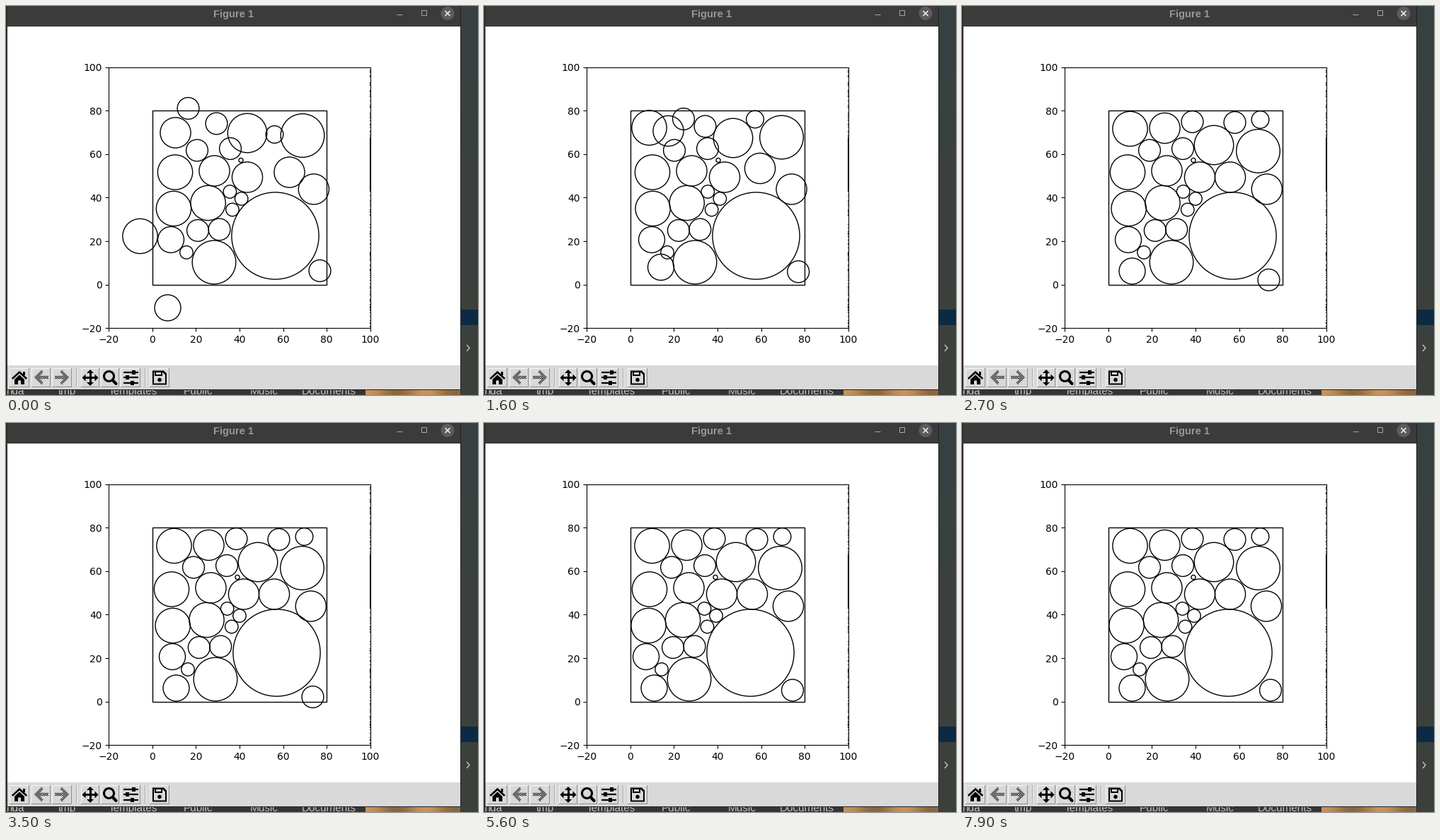
Animation of 667 by 551 pixels, one loop 8000 ms. Source, as a matplotlib script:

```python
import numpy as np
import matplotlib.pyplot as plt
from matplotlib.animation import FuncAnimation
from matplotlib.patches import Circle, Polygon, Rectangle

W, H = 667, 551
FRAMES, STEP = 80, 100
UNIT = 3.08            # pixels per data unit
X0, Y0 = 206.8, 394.6  # pixel position of the data origin

# Packed layout: radius in data units, centre in stage pixels
PACKING = [
    (5, 325.5, 164), (7, 286.5, 173), (5, 385.5, 165), (9, 356, 197),
    (4, 421.5, 161), (10, 418.5, 205.5), (5, 265, 204.5), (5, 312, 202),
    (1, 327, 218.5), (8, 234, 235.5), (7, 289.5, 233.5), (7, 336, 242.5),
    (7, 379, 242.5), (7, 430, 259.5), (8, 232.5, 287), (8, 281, 279),
    (3, 311.5, 263), (3, 328, 273), (3, 315.5, 288.5), (5, 297.5, 316.5),
    (20, 376.5, 325.5), (8, 237.5, 174), (6, 229, 331), (5, 267, 318),
    (3, 251, 349), (10, 290, 363), (5, 436, 378.5), (6, 240.5, 375.5)]

# Key points (step, x, y) of the circles that travel far before they settle
JOURNEYS = {
    0: [(3, 257.5, 145), (12, 262, 146), (16, 282, 160)],
    1: [(3, 239.5, 179.5), (16, 260.5, 177)],
    2: [(3, 297.5, 166.5), (16, 312.5, 170.5)],
    3: [(3, 341, 180), (16, 352, 187)],
    4: [(3, 379.5, 182), (16, 383, 160.5)],
    5: [(3, 419, 183.5), (16, 420.5, 186)],
    12: [(3, 400.5, 235.5), (16, 390, 230)],
    21: [(3, 189.5, 326), (13, 163, 322), (14, 231, 155), (16, 233.5, 172.5)],
    26: [(3, 443.5, 375), (22, 444.5, 377), (23, 449, 384), (27, 433.5, 388),
         (35, 433.5, 388), (41, 447.5, 379)],
    27: [(3, 228.5, 427.5), (6, 228, 438), (11, 230, 419), (16, 250, 370),
         (21, 247, 420), (22, 245.5, 394)]}

steps = np.arange(FRAMES)


def journey(points, x, y):
    arrival = max(22, points[-1][0] + 4)
    t, xs, ys = zip(*points, (arrival, x, y))
    return np.interp(steps, t, xs), np.interp(steps, t, ys)


def sway(x, y):
    """Everything starts a little to the right; lower circles settle last."""
    depth = np.clip((y - 250) / 70, 0, 1)
    upper = np.interp(steps, [3, 16, 22, 27], [5, 4, 1, 0])
    lower = np.interp(steps, [3, 16, 22, 27, 35, 42], [4, 8, 10, 6, 6, 0])
    return x + (1 - depth) * upper + depth * lower, np.full(FRAMES, y)


def track(i):
    _, x, y = PACKING[i]
    xs, ys = journey(JOURNEYS[i], x, y) if i in JOURNEYS else sway(x, y)
    return np.column_stack([(xs - X0) / UNIT, (Y0 - ys) / UNIT])


fig = plt.figure(figsize=((W + 0.01) / 100, (H + 0.01) / 100), dpi=100)
stage = fig.add_axes([0, 0, 1, 1])
stage.axis("off")


def rect(x, y, w, h, color, z=1):
    stage.add_patch(Rectangle((x, y), w, h, fc=color, ec="none", zorder=z,
                              antialiased=False))


def line(xs, ys, color="black", px=1.0, cap="butt"):
    stage.plot(xs, ys, color=color, lw=px * 0.72, zorder=6,
               solid_capstyle=cap, solid_joinstyle="miter")


def poly(points, cx, cy, color="black"):
    shape = Polygon(np.array(points) + (cx, cy), fc=color, ec="none", zorder=6)
    stage.add_patch(shape)
    return shape


def disc(x, y, r, color, z=6):
    stage.add_patch(Circle((x, y), r, fc=color, ec="none", zorder=z))


def desktop():
    rect(0, 0, W, H, "#393b3c", 0)
    for y in range(0, H, 50):
        rect(643, y, 24, 50, (0.215 + y / 25000, 0.25, 0.255 - y / 25000))
    rect(643, 430, 24, 22, "#0c2a43")
    line([651, 655, 651], [480, 484.5, 489], "#d0d0d0", 1.3)
    rect(0, 0, 2, H, "#36292b")
    rect(0, 543, 643, 8, "#353535")
    for x, name in [(13, "nda"), (86, "tmp"), (179, "Templates"),
                    (271.5, "Public"), (364.5, "Music"), (456.5, "Documents")]:
        stage.text(x, 550, name, color="#c4c4c4", size=11, ha="center",
                   va="baseline", family="Liberation Sans", zorder=2)
    for x in range(508, 642, 2):
        s = 0.66 + 0.12 * np.sin(x / 13)
        rect(x, 543, 2, 8, (s, s * 0.74, s * 0.45), 2)


def window():
    rect(2, 0, 640, 29, "#3b3b3b", 3)
    rect(2, 28, 640, 1, "#2b2b2b", 3)
    rect(2, 29, 640, 481, "white", 3)
    rect(2, 509, 640, 34, "#d9d9d9", 3)
    rect(642, 0, 1, 544, "#232323", 3)
    rect(0, 543, 643, 1, "#232323", 3)
    stage.text(321.5, 16, "Figure 1", color="#979797", size=10.6,
               weight="bold", family="Liberation Sans", ha="center",
               va="baseline", zorder=5)
    line([552, 560], [12.5, 12.5], "#a5a5a5")
    line([586.5, 593.5, 593.5, 586.5, 586.5], [6.5, 6.5, 13.5, 13.5, 6.5],
         "#a5a5a5")
    disc(624, 10.5, 9.5, "#5c5c5c", 5)
    for ys in ([7, 14], [14, 7]):
        line([620.5, 627.5], ys, "#eeeeee", 1.6)


def button(x, w):
    rect(x, 513, w, 27, "#8f8f8f", 4)
    rect(x, 513, w - 1, 26, "#f6f6f6", 4)
    rect(x + 1, 514, w - 2, 25, "#d9d9d9", 4)


def stippled_arrow(cx, cy, side):
    half = [(-10.5, 0), (0, -10.5), (3, -7.5), (-2.5, -2.2), (10, -2.2)]
    pts = half + [(x, -y) for x, y in half[:0:-1]]
    shape = poly([(side * x, y) for x, y in pts], cx, cy, "none")
    rows, cols = np.indices((24, 24))
    rgba = np.zeros((24, 24, 4))
    rgba[..., 3] = (rows + cols) % 2
    img = stage.imshow(rgba, extent=(cx - 12, cx + 12, cy + 12, cy - 12),
                       interpolation="nearest", aspect="auto", zorder=6)
    img.set_clip_path(shape)


def toolbar():
    for x, w in [(5, 28), (36, 27), (65, 28), (106, 26), (134, 26),
                 (162, 28), (203, 28)]:
        button(x, w)
    for x in (99, 196):
        rect(x, 513, 1, 26, "#a8a8a8", 4)
        rect(x + 1, 513, 1, 26, "#f2f2f2", 4)
    # home
    line([8.8, 19, 29.2], [528, 518.6, 528], px=2.6)
    poly([(-7, 2), (0, -4.6), (7, 2), (7, 9), (2, 9), (2, 3.5), (-2, 3.5),
          (-2, 9), (-7, 9)], 19, 527)
    rect(24, 518, 3, 5, "black", 6)
    stippled_arrow(50, 526, 1)
    stippled_arrow(79, 526, -1)
    # pan
    line([111, 127], [526.5, 526.5], px=3)
    line([119, 119], [518, 535], px=3)
    for dx, dy in [(1, 0), (0, 1), (-1, 0), (0, -1)]:
        head = [(11.5, 0), (6.5, -5), (6.5, 5)]
        poly([(dx * x - dy * y, dy * x + dx * y) for x, y in head],
             119, 526.5)
    # zoom
    stage.add_patch(Circle((145.5, 524.5), 7, fill=False, ec="black",
                           lw=2.2, zorder=6))
    line([150.5, 155.5], [529.8, 535], px=4.2, cap="round")
    # sliders
    for y, x in [(519, 180), (526.5, 171), (534, 178)]:
        line([166, 187], [y, y], px=2.2)
        rect(x - 2, y - 3, 5, 6, "black", 6)
    # save
    for r, color in [(10, "black"), (8, "#d9d9d9")]:
        poly([(-r, -r), (r - 4, -r), (r, 4 - r), (r, r), (-r, r)],
             217, 526.5, color)
    rect(210, 518, 11, 6, "black", 7)
    rect(212, 519, 7, 3, "#d9d9d9", 7)
    disc(217, 529.5, 2.8, "black", 7)


desktop()
window()
toolbar()
stage.set_xlim(0, W)
stage.set_ylim(H, 0)

side = 120 * UNIT
left, bottom = X0 - 20 * UNIT, Y0 + 20 * UNIT
ax = fig.add_axes([left / W, 1 - bottom / H, side / W, side / H])
ax.set(xlim=(-20, 100), ylim=(-20, 100),
       xticks=range(-20, 101, 20), yticks=range(-20, 101, 20))
ax.add_patch(Rectangle((0, 0), 80, 80, fill=False, ec="black", lw=1))

# ragged inner edge of the right spine
rng = np.random.default_rng(7)
for y in range(88, 455):
    if 187 < y < 263 or rng.random() < 0.35:
        ax.add_patch(Rectangle(((514 - X0) / UNIT, (Y0 - y - 1) / UNIT),
                               1 / UNIT, 1 / UNIT, fc="black", ec="none"))

tracks = [track(i) for i in range(len(PACKING))]
circles = [ax.add_patch(Circle(path[0], r, fill=False, ec="black", lw=1))
           for path, (r, _, _) in zip(tracks, PACKING)]


def draw(n):
    for circle, path in zip(circles, tracks):
        circle.center = tuple(path[n])
    return circles


anim = FuncAnimation(fig, draw, frames=FRAMES, interval=STEP, repeat=True,
                     repeat_delay=0, blit=False)
plt.show()
```
